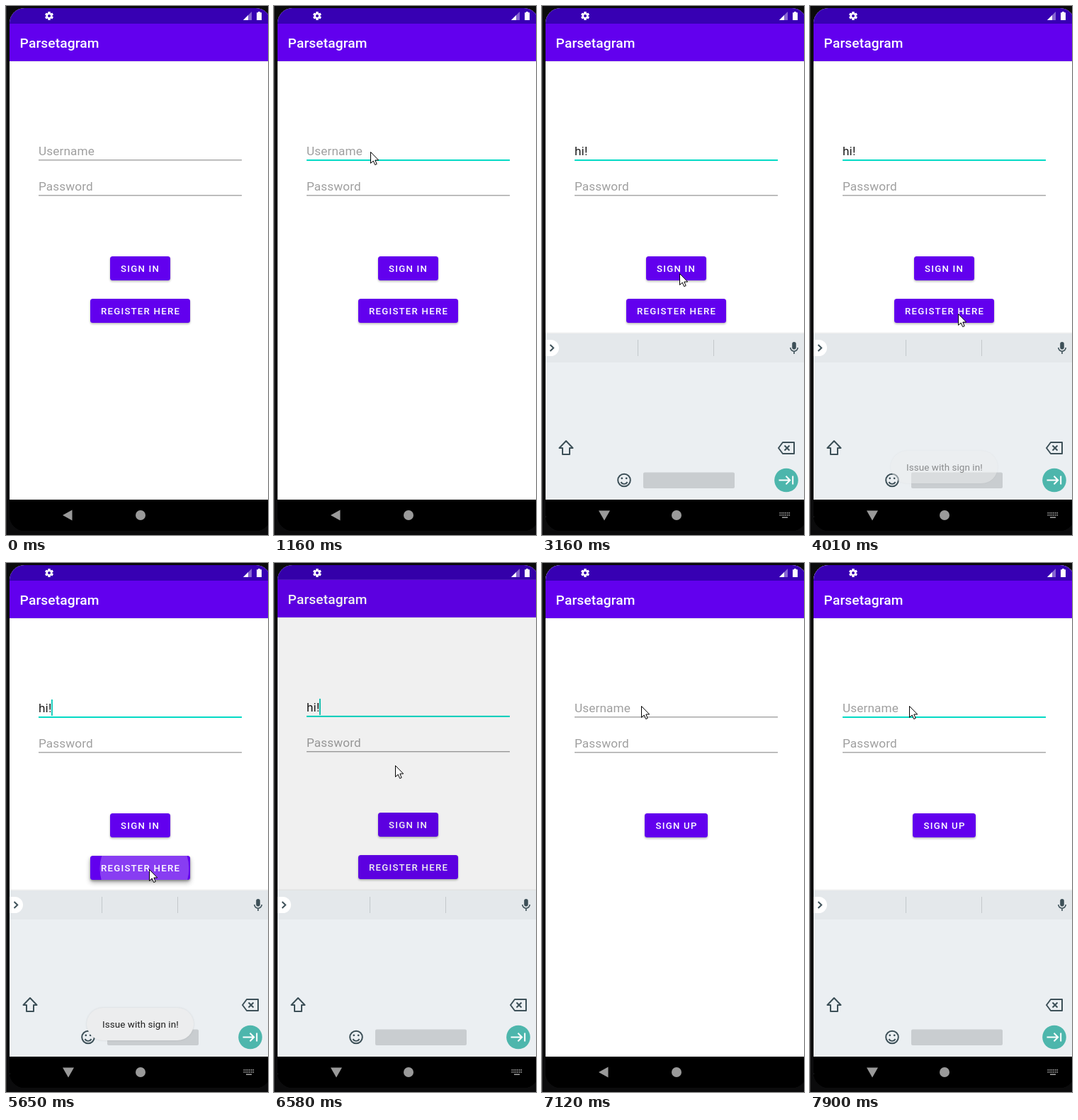
Animation, 370 px wide and 748 px high, one loop 8000 ms. Source, as an HTML page:

```html
<!DOCTYPE html>
<html lang="en">
<head>
<meta charset="utf-8">
<title>Sign in flow</title>
<style>
  html, body { margin: 0; width: 100%; height: 100%; overflow: hidden; background: #0b0b0c; }
  svg { display: block; width: 370px; height: 748px; }
  text { font-family: Roboto, "Open Sans", sans-serif; white-space: pre; }
  .title { font-size: 19.2px; font-weight: 500; letter-spacing: .12px; fill: #fff; }
  .field { font-size: 17.2px; letter-spacing: .12px; fill: #1b1b1b; }
  .hint { fill: #9f9f9f; }
  .label { font-size: 13.2px; font-weight: 500; letter-spacing: 1.25px; fill: #fff; }
  .toast { font-size: 13.4px; letter-spacing: .08px; fill: #1e1e1e; }
  .icon { fill: none; stroke: #3d5058; stroke-width: 2; }
</style>
</head>
<body>
<svg viewBox="0 0 370 748" xmlns="http://www.w3.org/2000/svg">
  <defs>
    <clipPath id="screenClip"><rect x="5" y="3" width="369" height="739" rx="21"/></clipPath>
    <clipPath id="revealClip"><rect id="reveal" x="5" y="3" width="369" height="695"/></clipPath>
    <clipPath id="appClip"><rect x="5" y="3" width="369" height="695"/></clipPath>
    <filter id="soft" x="-20%" y="-50%" width="140%" height="200%"><feGaussianBlur stdDeviation="1.5"/></filter>
    <filter id="deep" x="-20%" y="-50%" width="140%" height="200%"><feGaussianBlur stdDeviation="3.5"/></filter>
  </defs>
  <rect width="370" height="748" fill="#0b0b0c"/>
  <rect width="1" height="748" fill="#333"/>
  <g clip-path="url(#screenClip)">
    <rect x="5" y="3" width="369" height="739"/>
    <g clip-path="url(#appClip)">
      <g id="login"></g>
      <rect id="dim" x="5" y="3" width="369" height="695"/>
    </g>
    <g id="signup" clip-path="url(#revealClip)"><g id="signupBody"></g></g>
    <g id="keyboard"></g>
    <g id="toast">
      <rect x="114" y="629" width="151" height="46" rx="23" fill="#000" opacity=".1" filter="url(#soft)"/>
      <rect x="114" y="629" width="151" height="46" rx="23" fill="#ecedee"/>
      <text class="toast" x="136" y="657">Issue with sign in!</text>
    </g>
    <g id="statusIcons" fill="#fff">
      <g id="gear"></g>
      <path d="M335 20H347V8Z" opacity=".4"/>
      <path d="M335 20H342V13Z"/>
      <path d="M356 8H359V9.3H361V20H354V9.3H356Z"/>
    </g>
    <rect x="5" y="698" width="369" height="44"/>
    <g fill="#9a9a9a">
      <path id="back"/>
      <circle cx="190" cy="720" r="7"/>
      <g id="switcher"></g>
    </g>
  </g>
  <path id="pointer" d="M.5 .5V16.4L4.2 13L6.7 18.6L9.2 17.5L6.8 12H11.7Z" fill="#fff" stroke="#000" stroke-linejoin="round"/>
</svg>
<script>
const LOOP = 8000;
const $ = id => document.getElementById(id);
const set = (el, attrs) => { for (const k in attrs) el.setAttribute(k, attrs[k]); };
const clamp = v => Math.max(0, Math.min(1, v));
const ramp = (t, a, b) => clamp((t - a) / (b - a));
const mix = (a, b, p) => a + (b - a) * p;
const easeOut = p => 1 - (1 - p) ** 2;
const within = (t, spans) => spans.some(([a, b]) => t >= a && t < b);

// Buttons: x, width, y, label, label x
const BUTTONS = {
  signIn: [147, 85, 354, 'SIGN IN', 162],
  register: [119, 141, 414, 'REGISTER HERE', 134],
  signUp: [145, 89, 354, 'SIGN UP', 160.5]
};

function button(id) {
  const [x, w, y, label, tx] = BUTTONS[id];
  const box = `x="${x}" width="${w}" height="34" rx="3.5"`;
  return `<clipPath id="${id}Clip"><rect ${box} y="${y}"/></clipPath>
    <rect ${box} y="${y + 1.5}" opacity=".3" filter="url(#soft)"/>
    <rect id="${id}Lift" ${box} y="${y + 4}" opacity="0" filter="url(#deep)"/>
    <rect ${box} y="${y}" fill="#6200ee"/>
    <g clip-path="url(#${id}Clip)"><circle id="${id}Ripple" fill="#fff" opacity="0"/></g>
    <text class="label" x="${tx}" y="${y + 22}">${label}</text>`;
}

const screen = (id, ids) => `
  <rect x="5" y="0" width="369" height="760" fill="#fff"/>
  <rect x="5" y="78" width="369" height="1" opacity=".08"/>
  <rect x="5" y="-20" width="369" height="45" fill="#3700b3"/>
  <rect x="5" y="25" width="369" height="53" fill="#6200ee"/>
  <text class="title" x="19.6" y="59">Parsetagram</text>
  <text id="${id}Text" class="field" x="46" y="211"></text>
  <rect id="${id}Compose" x="46" y="212.5" height="1" fill="#4b5a60"/>
  <rect id="${id}Line" x="46" width="287"/>
  <rect id="${id}Caret" y="193" width="1.8" height="23" fill="#03c9b7"/>
  <text class="field hint" x="46" y="261">Password</text>
  <rect x="46" y="267.2" width="287" height="1.3" fill="#9b9b9b"/>
  ${ids.map(button).join('')}`;

$('login').innerHTML = screen('login', ['signIn', 'register']);
$('signupBody').innerHTML = screen('signup', ['signUp']);

$('keyboard').innerHTML = `
  <rect x="5" y="461.5" width="369" height="2" opacity=".06"/>
  <rect x="5" y="463" width="369" height="260" fill="#ebeff2"/>
  <rect x="5" y="463" width="369" height="41" fill="#e4e8eb"/>
  <path d="M135.5 472V495M242.5 472V495" stroke="#c3c8cb"/>
  <path d="M5 472H12.5A11.5 11.5 0 0 1 12.5 495H5Z" fill="#fff"/>
  <path class="icon" d="M11.5 479L16.2 483.5L11.5 488"/>
  <rect x="353.2" y="475" width="5.6" height="10.5" rx="2.8" fill="#3d5058"/>
  <path class="icon" stroke-width="1.6" style="stroke-width:1.6" d="M350.8 483A5.2 5.2 0 0 0 361.2 483M356 488V492"/>
  <path class="icon" stroke-linejoin="round" d="M34 615L43.5 625H39V634H29V625H24.5Z"/>
  <path class="icon" stroke-linejoin="round" d="M340 617H356V633H340L334 625Z"/>
  <path class="icon" d="M342.5 621.5L349.5 628.5M349.5 621.5L342.5 628.5"/>
  <circle class="icon" cx="116" cy="670.5" r="8.8"/>
  <path class="icon" d="M111.5 673A5 5 0 0 0 120.5 673" style="stroke-width:1.8"/>
  <circle cx="112.8" cy="667.8" r="1.4" fill="#3d5058"/>
  <circle cx="119.2" cy="667.8" r="1.4" fill="#3d5058"/>
  <rect x="143" y="659.5" width="129" height="22.5" rx="2" fill="#c9cdd0"/>
  <circle cx="345" cy="670.5" r="16.8" fill="#4db6ac"/>
  <path d="M334.5 670.5H350M344.5 664.8L350.2 670.5L344.5 676.2M354.2 664.5V676.5" fill="none" stroke="#fff" stroke-width="2"/>`;

const teeth = [0, 60, 120].map(a =>
  `<rect x="59.3" y="8" width="3.4" height="12" rx=".6" transform="rotate(${a} 61 14)"/>`).join('');
$('gear').innerHTML = teeth + '<circle cx="61" cy="14" r="3.2" fill="none" stroke="#fff" stroke-width="2.4"/><circle cx="61" cy="14" r="2" fill="#3700b3"/>';

let keys = '<rect x="339" y="722.4" width="8" height="1.6"/>';
for (let i = 0; i < 12; i++)
  keys += `<rect x="${335.5 + i % 6 * 2.6}" y="${716 + Math.floor(i / 6) * 3}" width="1.6" height="1.7"/>`;
$('switcher').innerHTML = keys;

// Pointer path: time, x, y
const PATH = [
  [70, 282, 620], [220, 166, 319], [400, 166, 319], [990, 136, 206],
  [2810, 136, 206], [3160, 194, 378], [3780, 194, 378], [3980, 209, 435],
  [4400, 209, 435], [4700, 215, 668], [4980, 215, 668], [5400, 202, 433],
  [6240, 202, 433], [6340, 172, 318], [6460, 172, 318], [6560, 171, 286],
  [6840, 171, 286], [7120, 140, 202]
];

function pointerAt(t) {
  const i = PATH.findIndex(k => k[0] > t);
  if (i < 0) return PATH[PATH.length - 1].slice(1);
  const [a, b] = [PATH[i - 1], PATH[i]];
  const p = ramp(t, a[0], b[0]);
  return [mix(a[1], b[1], p), mix(a[2], b[2], p)];
}

function press(id, t, down, up, touchX, touchY) {
  const [x, w, y] = BUTTONS[id];
  const p = ramp(t, down, down + 225);
  const grow = mix(p, easeOut(p), .5);
  const held = ramp(t, down, down + 75) * (1 - ramp(t, up, up + 200));
  set($(id + 'Ripple'), {
    cx: mix(touchX, x + w / 2, grow),
    cy: mix(touchY, y + 17, grow),
    r: mix(w * .3, w / 2 + 11, grow),
    opacity: .24 * held
  });
  set($(id + 'Lift'), { opacity: .3 * held });
}

function field(id, typed, composing, focused, caret) {
  const el = $(id + 'Text');
  const value = typed || 'Username';
  if (el.textContent !== value) el.textContent = value;
  set(el, { class: typed ? 'field' : 'field hint' });
  const end = [46, 55.6, 59.8, 64][typed.length];
  set($(id + 'Compose'), { width: composing ? end - 46 : 0 });
  set($(id + 'Caret'), { x: end, opacity: +caret });
  set($(id + 'Line'), focused
    ? { y: 217, height: 2, fill: '#03dac5' }
    : { y: 217.2, height: 1.3, fill: '#9b9b9b' });
}

function cubic(s, a, b, c, d) {
  const q = 1 - s;
  return q * q * q * a + 3 * q * q * s * b + 3 * q * s * s * c + s * s * s * d;
}

// Two joined Bezier pieces: quick start, very long settle
function emphasized(x) {
  const [xs, ys] = x < 1 / 6
    ? [[0, .05, .1333, .1667], [0, 0, .06, .4]]
    : [[.1667, .2083, .25, 1], [.4, .82, 1, 1]];
  let lo = 0, hi = 1;
  for (let i = 0; i < 20; i++) {
    const m = (lo + hi) / 2;
    if (cubic(m, ...xs) < x) lo = m; else hi = m;
  }
  return cubic(lo, ...ys);
}

function draw(t) {
  const typed = t < 1850 ? '' : t < 1920 ? 'h' : t < 2320 ? 'hi' : 'hi!';
  const caretOn = within(t, [[1230, 2870], [3320, 3870], [4410, 4870], [5400, LOOP]]);
  field('login', typed, t < 2320, t >= 1160, caretOn);
  field('signup', '', false, t >= 7270, within(t, [[7410, 7890]]));
  press('signIn', t, 3470, 3600, 194, 378);
  press('register', t, 5560, 6290, 202, 433);

  const open = emphasized(ramp(t, 6540, 6965));
  set($('login'), { transform: `translate(0 ${-13 * open})` });
  set($('dim'), { opacity: .1 * ramp(t, 6510, 6627) });
  set($('signup'), { display: t >= 6540 ? 'inline' : 'none' });
  set($('signupBody'), { transform: `translate(0 ${28 * (1 - open)})` });
  const top = 3 + 695 * .959 * (1 - open);
  set($('reveal'), { y: top, height: 698 - top });

  const shown = t < 6000 ? easeOut(ramp(t, 1660, 1850))
    : t < 7200 ? 1 - ramp(t, 6640, 6840)
    : easeOut(ramp(t, 7560, 7740));
  set($('keyboard'), { opacity: shown, transform: `translate(0 ${24 * (1 - shown)})` });
  const typing = within(t, [[1690, 6720], [7580, LOOP]]);
  set($('back'), { d: typing ? 'M80 713.5H96L88 727.5Z' : 'M80 720L93.5 712.5V727.5Z' });
  set($('switcher'), { opacity: +typing });

  set($('toast'), { opacity: ramp(t, 3940, 4090) * (1 - ramp(t, 5780, 5940)) });

  const visible = t >= 70;
  set($('pointer'), { display: visible ? 'inline' : 'none' });
  if (visible) set($('pointer'), { transform: `translate(${pointerAt(t).map(Math.round)})` });
}

const start = performance.now();
function tick() {
  draw((performance.now() - start) % LOOP);
  requestAnimationFrame(tick);
}
tick();
</script>
</body>
</html>
```
